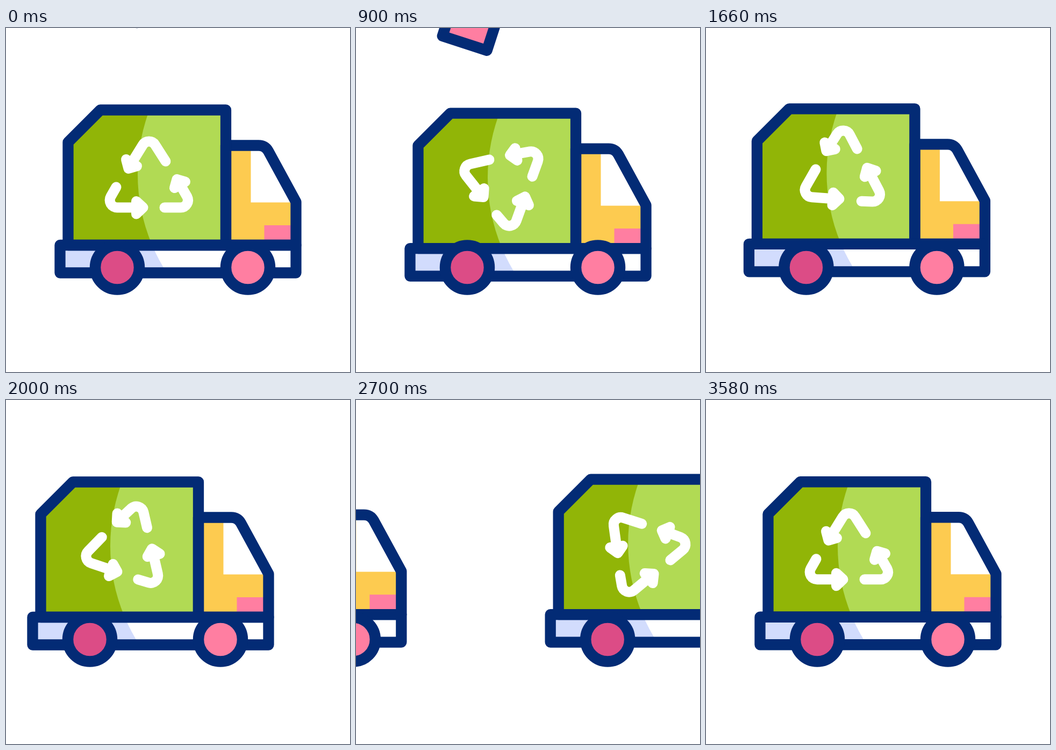
Animation, 640 px wide and 640 px high, one loop 3600 ms. Source, as an HTML page with a canvas:

```html
<!DOCTYPE html>
<html lang="en">
<head>
<meta charset="utf-8">
<title>Recycling truck</title>
<style>
  html, body { margin: 0; width: 100%; height: 100%; overflow: hidden; background: #fff; }
  canvas { display: block; width: 640px; height: 640px; }
</style>
</head>
<body>
<canvas id="stage" width="640" height="640"></canvas>
<script>
const ctx = document.getElementById('stage').getContext('2d');
const LOOP = 3600;
const BEAT = 400;
const NAVY = '#032b75', WHITE = '#fff', PINK = '#ff7ea1', ROSE = '#dc4c86';
const LIME = '#b1da54', GREEN = '#91b507', YELLOW = '#fdcb50', LILAC = '#d2dcfd';

const box = new Path2D('M115.5 404V212.5L175.5 152.5H409V404Z');
const cab = new Path2D('M409 218.5H470Q482 218.5 488 229L539.5 323.5V404H409Z');
const base = new Path2D('M100.5 404H539.5V455.5H100.5Z');
const shine = new Path2D();
shine.arc(583, 272, 338, 0, Math.PI * 2);

const PIVOT = [266, 278.5];
const arrows = [
  ['M297 248L277.5 217.5A13.5 13.5 0 0 0 254.5 217.5L235 249', 'M223.5 244.5L243.5 257L228 261.5Z'],
  ['M205 296L195 313.5A13.6 13.6 0 0 0 207 334H242', 'M242.5 322.5V346L255 334Z'],
  ['M295 334H325A13.7 13.7 0 0 0 337 314L322 288', 'M318 281.5L333.5 286L313.5 297.5Z']
].map(paths => paths.map(d => new Path2D(d)));

// Each piece of waste drops for one beat: horizontal position and tilt in degrees.
const waste = [[217, 18], [300, -18], [217, 18]];

const clamp = u => Math.min(1, Math.max(0, u));
const ease = u => u * u * (3 - 2 * u);
const tween = (t, start, end, from, to) =>
  from + (to - from) * ease(clamp((t - start) / (end - start)));
const radians = deg => deg * Math.PI / 180;

function bounce(t) {
  if (t < BEAT) return 0;
  const phase = (t % BEAT) / (BEAT / 2);
  const swing = ease(phase < 1 ? phase : 2 - phase);
  return swing * (t < 1600 ? 12 : -10);
}

const spin = t => t < 1600 ? tween(t, 0, 1600, 0, -118) : tween(t, 1600, 3400, -118, 0);

function stroke(path, color, width) {
  ctx.strokeStyle = color;
  ctx.lineWidth = width;
  ctx.stroke(path);
}

function fill(path, color) {
  ctx.fillStyle = color;
  ctx.fill(path);
}

function rect(x, y, w, h, color) {
  ctx.fillStyle = color;
  ctx.fillRect(x, y, w, h);
}

function inside(path, draw) {
  ctx.save();
  ctx.clip(path);
  draw();
  ctx.restore();
}

function drawSymbol(angle) {
  ctx.save();
  ctx.translate(...PIVOT);
  ctx.rotate(radians(angle));
  ctx.translate(-PIVOT[0], -PIVOT[1]);
  for (const [shaft, head] of arrows) {
    stroke(shaft, WHITE, 19);
    fill(head, WHITE);
    stroke(head, WHITE, 19);
  }
  ctx.restore();
}

function drawBody(angle) {
  inside(cab, () => {
    rect(409, 210, 135, 200, YELLOW);
    rect(455.5, 210, 90, 114.5, WHITE);
    rect(480.5, 367, 60, 40, PINK);
  });
  fill(box, GREEN);
  inside(box, () => fill(shine, LIME));
  fill(base, LILAC);
  inside(base, () => fill(shine, WHITE));
  for (const path of [cab, box, base]) stroke(path, NAVY, 20.3);
  drawSymbol(angle);
}

function drawWheel(x, color) {
  const wheel = new Path2D();
  wheel.arc(x, 445.5, 41, 0, Math.PI * 2);
  fill(wheel, color);
  stroke(wheel, NAVY, 20.5);
}

function drawTruck(x, t) {
  ctx.save();
  ctx.translate(x, 0);
  ctx.save();
  ctx.translate(0, bounce(t));
  drawBody(spin(t));
  ctx.restore();
  drawWheel(207, ROSE);
  drawWheel(450, PINK);
  ctx.restore();
}

function drawWaste(t) {
  const index = Math.floor(t / BEAT);
  if (index >= waste.length) return;
  const [x, tilt] = waste[index];
  const start = index * BEAT;
  const piece = new Path2D('M-43.5 -48H43.5V48H-43.5Z');
  ctx.save();
  ctx.translate(x, tween(t, start, start + BEAT, -69, 256));
  ctx.rotate(radians(tilt));
  fill(piece, PINK);
  stroke(piece, NAVY, 20.3);
  ctx.restore();
}

function render(t) {
  rect(0, 0, 640, 640, WHITE);
  ctx.lineCap = ctx.lineJoin = 'round';
  drawWaste(t);
  if (t < 3400) {
    const x = t < 2000 ? tween(t, 1400, 2000, 0, -51) : tween(t, 2000, 3400, -51, 572);
    drawTruck(x, t);
  }
  if (t >= 2400) drawTruck(tween(t, 2400, 3400, -581.5, 0), t);
}

const begin = performance.now();
function frame() {
  render((performance.now() - begin) % LOOP);
  requestAnimationFrame(frame);
}
frame();
</script>
</body>
</html>
```
